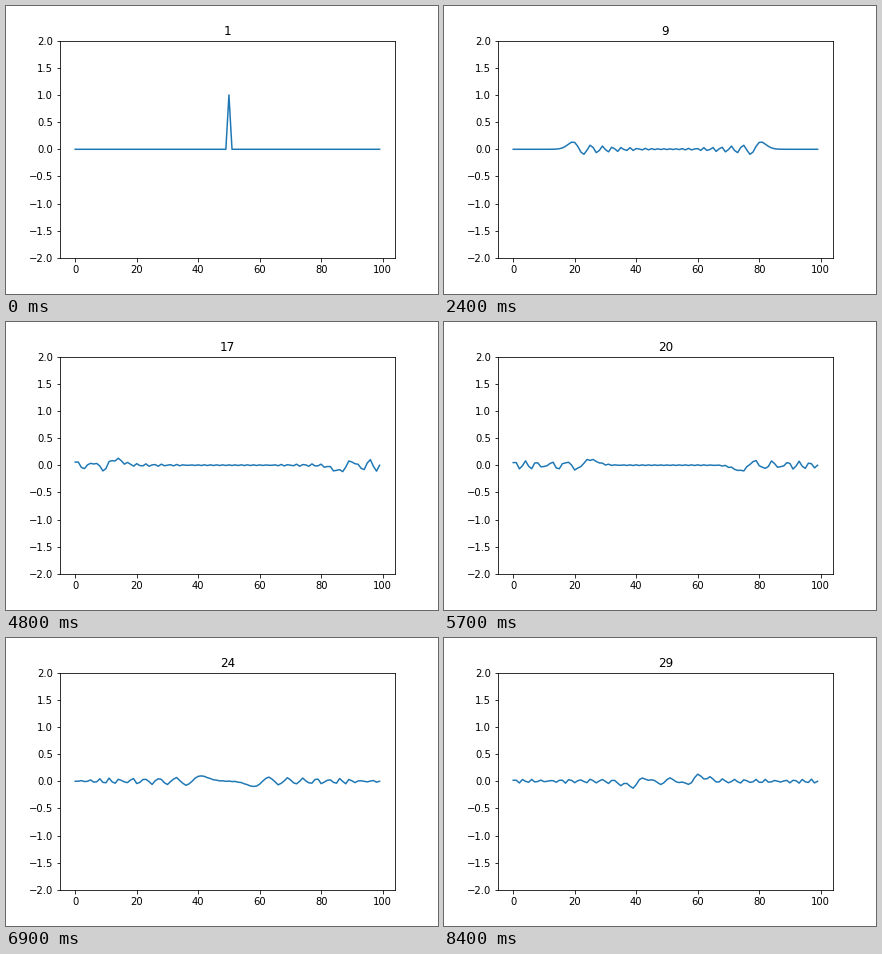
These frames come from a looping animation (432x288 px, 8.7 s). A matplotlib script:

```python
import numpy as np
import matplotlib.pyplot as plt
from matplotlib.animation import FuncAnimation

FRAMES = 29
INTERVAL = 300
CELLS = 100
START = 50            # cell that is struck
COURANT = 0.4         # cells travelled per time step
STEPS = 10            # time steps per frame
HELD = 5 * STEPS      # the struck cell is held still for this many steps


def simulate():
    """String struck for one time step: free left end, fixed right end."""
    old, now = np.zeros(CELLS), np.zeros(CELLS)
    now[START] = 1
    shots = [now]
    for step in range(1, (FRAMES - 1) * STEPS + 1):
        new = np.zeros(CELLS)
        bend = now[2:] - 2 * now[1:-1] + now[:-2]
        new[1:-1] = 2 * now[1:-1] - old[1:-1] + COURANT**2 * bend
        if step <= HELD:
            new[START] = 0
        new[0] = new[1]
        old, now = now, new
        if step % STEPS == 0:
            shots.append(now)
    return shots


shots = simulate()

fig, ax = plt.subplots(figsize=(6, 4), dpi=72)
fig.subplots_adjust(bottom=0.125)
line, = ax.plot(np.arange(CELLS), shots[0])
ax.set_ylim(-2, 2)
title = ax.set_title("1")


def update(frame):
    line.set_ydata(shots[frame])
    title.set_text(str(frame + 1))
    return line, title


anim = FuncAnimation(fig, update, frames=FRAMES, interval=INTERVAL,
                     repeat=True, repeat_delay=0)
plt.show()
```
